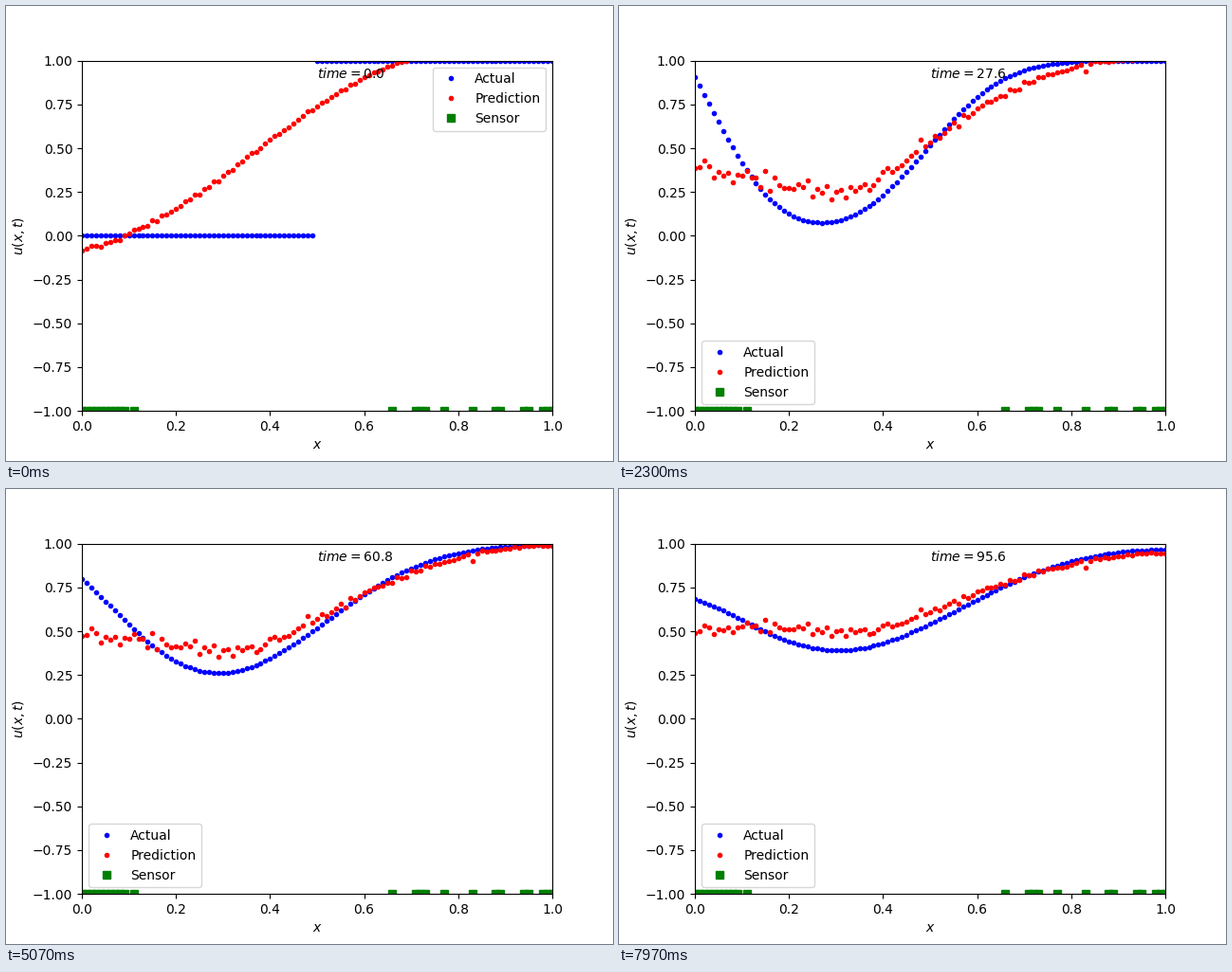
A matplotlib script for the animation above (8 s loop, 640 by 480 pixels).

```python
import numpy as np
import matplotlib.pyplot as plt
from matplotlib.animation import FuncAnimation

FRAMES, LOOP_MS, DT = 240, 8000, 0.4
x = np.linspace(0, 1, 101)
times = DT * np.arange(FRAMES)


def quarter_wave(u):
    return np.sin(np.pi / 2 * np.clip(u, -1, 1))


def solve_heat(diffusivity=3e-4, substeps=4):
    """Step profile, cooling wall on the left, insulated wall on the right."""
    u = np.where(np.arange(101) >= 50, 1.0, 0.0)
    h = DT / substeps
    r = diffusivity * h / (x[1] - x[0]) ** 2
    rows = [u.copy()]
    for k in range(1, (FRAMES - 1) * substeps + 1):
        padded = np.append(u, u[-2])
        u[1:] += r * (padded[2:] - 2 * padded[1:-1] + padded[:-2])
        u[0] = 1 - k * h / 300
        if k % substeps == 0:
            rows.append(u.copy())
    return np.array(rows)


def predict(valley=0.35):
    """Noisy estimate: an S-curve that settles into a slowly filling valley."""
    t = times[:, None]
    p = t / 100
    start = 0.475 + 0.58 * quarter_wave((x - 0.365) / 0.448)

    floor = 0.052 * np.sqrt(t) - 0.02
    top = 1.015 - 0.08 * p ** 2
    width = 0.63 - 0.2 * np.exp(-t / 20)
    ramp = quarter_wave(np.maximum(x - valley, 0) / width) ** (0.95 + 0.35 * p)
    left = np.clip(1 - x / valley, 0, 1)
    tilt = 0.16 * (1 - p ** 2) * left ** 2
    hump = 0.035 * p * np.sin(np.pi * left)
    later = floor + (top - floor) * ramp + tilt + hump

    # Scatter stays fixed along x, strongest on the left and fading with time
    noise = np.random.default_rng(4).normal(size=x.size)
    noise[83] = -8  # one stray reading
    fade = np.clip((0.75 - x) / 0.3, 0, 1)
    spread = 0.005 + 0.0115 * fade * (2.1 - 1.15 * p)

    early = np.exp(-t / 2)
    return (early * start + (1 - early) * later
            + (1 - 0.8 * early) * spread * noise)


actual = solve_heat()
prediction = predict()
sensors = np.r_[0:10, 11, 66, 71:74, 77, 83, 88:90, 94:96, 98:101] / 100

fig, ax = plt.subplots(figsize=(6.4, 4.8), dpi=100)
actual_dots, = ax.plot(x, actual[0], "b.", label="Actual")
predicted_dots, = ax.plot(x, prediction[0], "r.", label="Prediction")
ax.plot(sensors, -np.ones_like(sensors), "gs", label="Sensor")
clock = ax.text(0.5, 0.9, "")
ax.set(xlim=(0, 1), ylim=(-1, 1), xlabel="$x$", ylabel="$u(x,t)$")
ax.legend(loc="best")


def draw(i):
    actual_dots.set_ydata(actual[i])
    predicted_dots.set_ydata(prediction[i])
    clock.set_text(f"$time = {times[i]:.1f}$")
    return actual_dots, predicted_dots, clock


anim = FuncAnimation(fig, draw, frames=FRAMES, interval=LOOP_MS / FRAMES,
                     init_func=lambda: draw(0), repeat=True, repeat_delay=0)
plt.show()
```
